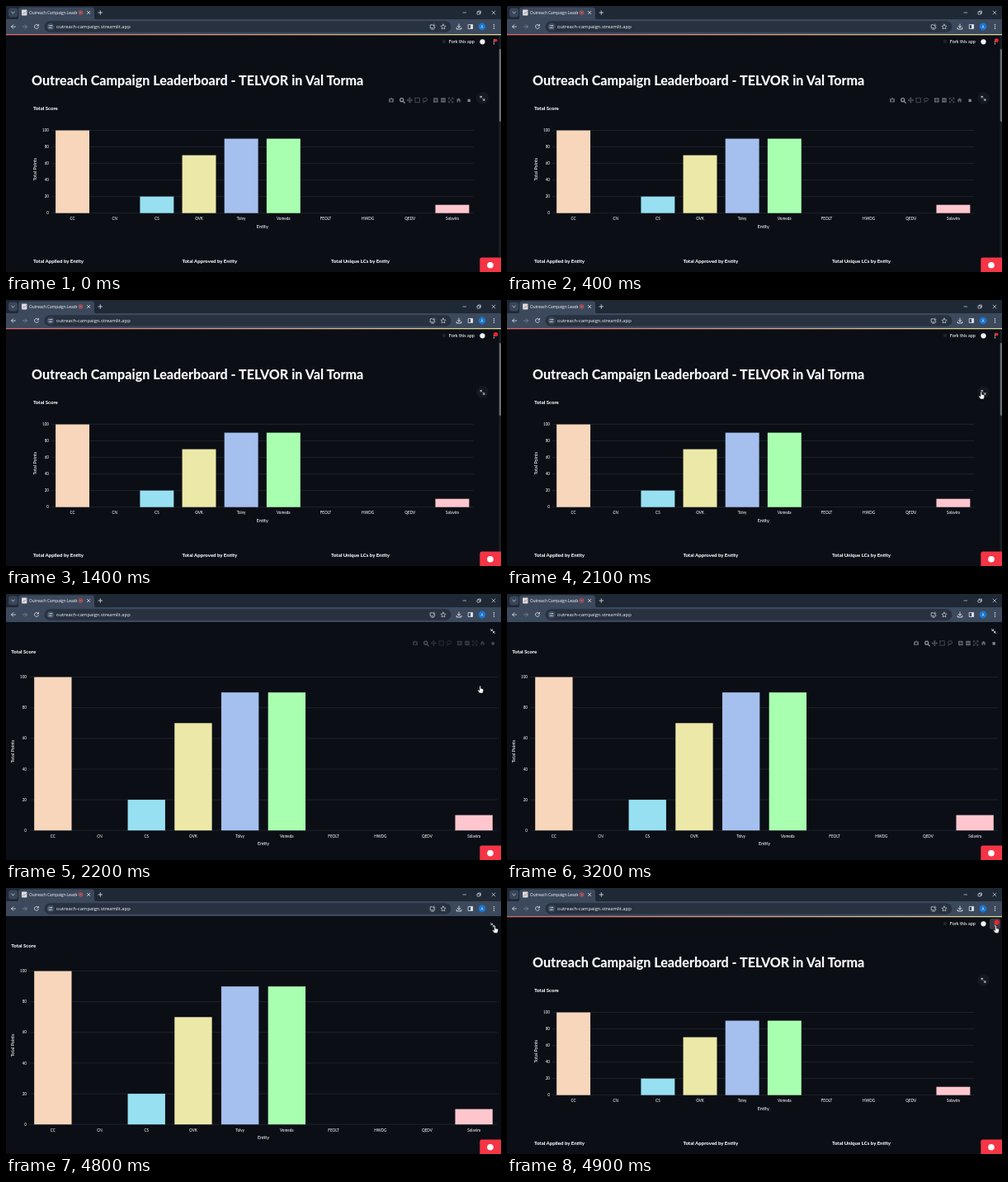
Write an HTML page that moves like this. It is 600x322 px and loops after 5000 ms.

```html
<!DOCTYPE html>
<html lang="en">
<head>
<meta charset="utf-8">
<title>Leaderboard</title>
<style>
  html, body { margin: 0; width: 100%; height: 100%; overflow: hidden; background: #0b0e15; }
  svg { display: block; width: 600px; height: 322px; font-family: Lato, "Open Sans", sans-serif; font-weight: 500; }
  .ui { font-family: "Open Sans", "Noto Sans", sans-serif; font-weight: 400; }
  .line { fill: none; stroke: #dfe4ea; stroke-width: .8; stroke-linecap: round; stroke-linejoin: round; }
  .modebar .line { stroke: #5f646c; }
</style>
</head>
<body>
<svg id="stage" viewBox="0 0 600 322">
  <defs>
    <linearGradient id="strip"><stop stop-color="#d9696c"/><stop offset="1" stop-color="#dcd79a"/></linearGradient>
    <clipPath id="tabClip"><rect x="27" y="2" width="59" height="13"/></clipPath>
  </defs>
</svg>
<script>
const LOOP = 5000, OPEN = 2200, CLOSE = 4900;
const stage = document.getElementById('stage');
const clamp = v => Math.max(0, Math.min(1, v));

// y is the vertical middle of the text
const text = (x, y, size, str, attrs = '') =>
  `<text x="${x}" y="${y + size * .35}" font-size="${size}" fill="#f8f9fb" ${attrs}>${str}</text>`;
const rect = (x, y, w, h, fill, r = 0) =>
  `<rect x="${x}" y="${y}" width="${w}" height="${h}" rx="${r}" fill="${fill}"/>`;
const dot = (x, y, r, fill) => `<circle cx="${x}" cy="${y}" r="${r}" fill="${fill}"/>`;
const line = (d, attrs = '') => `<path class="line" d="${d}" ${attrs}/>`;
const at = (x, y, body) => `<g transform="translate(${x} ${y})">${body}</g>`;
const kebab = (x, y) => [-2.3, 0, 2.3].map(d => dot(x, y + d, .7, '#e6eaef')).join('');
const bold = 'font-weight="800"', middle = 'text-anchor="middle"';

function browser() {
  return `<g class="ui">
    ${rect(0, 0, 600, 17, '#1f2835')}
    ${rect(3, 2.5, 11, 11, '#38465a', 3)}${line('M6.8 7.3l1.7 1.6 1.7-1.6')}
    <path d="M12 16.5q3 0 3-3V5q0-3.5 3.5-3.5h85q3.5 0 3.5 3.5v8.5q0 3 3 3z" fill="#3c495c"/>
    ${rect(0, 16, 600, 18, '#3c495c')}
    ${rect(19, 4.6, 6.4, 6.8, '#dcdfe3', .6)}${line('M20.3 9.8l1.5-2 1.2 1 1.4-2.2', 'style="stroke:#b0716d;stroke-width:.7"')}
    <g clip-path="url(#tabClip)">${text(28, 8, 4.8, 'Outreach Campaign Leaderboard')}</g>
    <circle cx="90.5" cy="8" r="2.4" fill="none" stroke="#d45a58" stroke-width=".8"/>${dot(90.5, 8, 1.2, '#ef5350')}
    ${line('M98.4 6.3l3.4 3.4m0-3.4l-3.4 3.4M112 8h4.6M114.3 5.7v4.6')}
    ${line('M554 8h3.6M571.4 7h3v3h-3zM572.4 7V6h3v3h-1M589 6l4 4m0-4l-4 4', 'style="stroke-width:.65"')}
    ${line('M11.5 25H6.6m2.2-2.3L6.5 25l2.3 2.3')}
    ${line('M20.5 25h4.9m-2.2-2.3l2.3 2.3-2.3 2.3', 'style="stroke:#7f8b9a"')}
    ${line('M39.2 23.6a2.5 2.5 0 1 0 .2 2.2M39.4 22.3v1.7h-1.7')}
    ${rect(46.5, 18.2, 493, 13.6, '#273140', 6.8)}
    ${dot(54, 25, 4.6, '#3c495c')}
    ${line('M51.8 23.8h2.2m1.4 0h.6M51.8 26.4h.6m1.4 0h2.2', 'style="stroke-width:.7"')}
    ${dot(54.8, 23.8, .7, '#dfe4ea')}${dot(53.2, 26.4, .7, '#dfe4ea')}
    ${text(61, 24.7, 5.8, 'outreach-campaign.streamlit.app')}
    ${line('M517 22.8h-2.8v4h5.6v-1.2M515.7 28.2h2.6M518.8 22v2.6m-1.1-1l1.1 1.1 1.1-1.1', 'style="stroke-width:.7"')}
    ${line('M530 22.1l.9 1.9 2.1.3-1.5 1.5.4 2.1-1.9-1-1.9 1 .4-2.1-1.5-1.5 2.1-.3z', 'style="stroke-width:.65"')}
    ${line('M549 22v4m-1.8-1.6l1.8 1.8 1.8-1.8M546.2 26.4v1.6h5.6v-1.6', 'style="stroke-width:.9"')}
    ${line('M560.6 22.5h5v5h-5z')}${rect(563.2, 22.5, 2.5, 5, '#e6eaef')}
    ${dot(577, 25, 4.4, '#1976d2')}${text(577, 25, 4.6, 'A', middle)}
    ${kebab(591.5, 25)}
  </g>`;
}

const bars = [
  ['CC', 100, '#f8d6bb'], ['CN', 0], ['CS', 20, '#97e0f2'], ['OVK', 70, '#ece9a8'],
  ['Tolvy', 90, '#a5c0ee'], ['Vomeda', 90, '#a9ffb0'], ['FEOLT', 0], ['HWDG', 0],
  ['QEDV', 0], ['Solavira', 10, '#ffc6ce']
];

function chart({ left, right, top, base, tickX, titleX, axisY, labelY }) {
  const step = (right - left) / bars.length, y = v => base - (base - top) * v / 100;
  let out = '';
  for (let v = 0; v <= 100; v += 20) {
    out += `<path d="M${left} ${y(v)}H${right}" stroke="#262c36" stroke-width=".7"/>`;
    out += text(tickX, y(v), 4.6, v, 'text-anchor="end"');
  }
  bars.forEach(([name, v, fill], i) => {
    const x = left + step * (i + .5);
    if (v) out += rect(x - step * .4, y(v), step * .8, base - y(v), fill);
    out += text(x, labelY, 4.6, name, middle);
  });
  const mid = (top + base) / 2 - 3;
  return out + text((left + right) / 2, axisY, 5.4, 'Entity', middle) +
    at(titleX, mid, `<g transform="rotate(-90)">${text(0, 0, 5.4, 'Total Points', middle)}</g>`);
}

// Chart toolbar, placed relative to its first icon
function modebar(x, y) {
  const gray = '#5f646c', back = '#0b0e15';
  const lens = 'style="stroke:#959aa2;stroke-width:1.2"', cut = `style="stroke:${back}"`;
  const button = rect(-2.8, -2.8, 5.6, 5.6, gray, .5);
  const parts = [
    [0, rect(-3, -2, 6, 4.6, gray, .6) + rect(-1.2, -2.8, 2.4, 1.2, gray) + dot(0, .3, 1.3, back)],
    [13, `<circle r="2" cx="-.3" cy="-.3" class="line" ${lens}/>` + line('M1.5 1.5l1.8 1.8', lens)],
    [22.3, line('M-3 0h6M0-3v6M-2-1l-1 1 1 1M2-1l1 1-1 1M-1-2l1-1 1 1M-1 2l1 1 1-1')],
    [31.6, line('M-2.7-2.7h5.4v5.4h-5.4z', 'stroke-dasharray="1.1 1.1"')],
    [41, line('M-1.5 1.3C-4-1-2-2.8 .5-2.6S3.6.2 1 .9-.8 1-1.5 1.3t-.6 1.6')],
    [53.8, button + line('M-1.5 0h3M0-1.5v3', cut)],
    [63, button + line('M-1.5 0h3', cut)],
    [72.2, line('M-2.6-2.6l5.2 5.2m0-5.2l-5.2 5.2M-2.8-1.2v-1.6h1.6M1.2-2.8h1.6v1.6M2.8 1.2v1.6H1.2M-1.2 2.8h-1.6V1.2', 'style="stroke-width:.6"')],
    [81.6, `<path d="M-3 .1L0-2.7 3 .1H2.1V2.6H.7V.8H-.7V2.6H-2.1V.1z" fill="${gray}"/>`],
    [94.2, rect(-1.7, -1.3, 3.4, 3.4, '#80858c')]
  ];
  return `<g class="modebar">${at(x, y, parts.map(([dx, s]) => at(dx, 0, s)).join(''))}</g>`;
}

const expand = line('M-2.4-.7v-1.7h1.7M-2.4-2.4L-.6-.6M2.4.7v1.7H.7M2.4 2.4L.6.6', 'style="stroke-width:.75"');
const collapse = line('M-.6-2.2v1.6h-1.6M-.6-.6l-2-2M.6 2.2V.6h1.6M.6.6l2 2', 'style="stroke-width:.8"');

const page = `<g id="page">
  ${rect(0, 34, 600, 1.3, 'url(#strip)')}
  <g id="scrollbar">${rect(597.5, 36, 2.5, 286, '#1b1f27')}${rect(597.8, 52, 2.2, 88, '#6a6e75', 1)}</g>
  ${dot(531, 43, 2.2, '#20242c')}
  ${text(536.8, 43, 5.45, 'Fork this app')}
  ${dot(577.5, 43.3, 3.1, '#f4f5f7')}
  <rect id="menuHover" x="585" y="37" width="13" height="13" rx="2.5" fill="#343943"/>
  ${kebab(591.5, 43.5)}
  <circle id="rec" cx="593.6" cy="41.6" fill="#e8252f"/>
  ${text(31, 90, 16.1, 'Outreach Campaign Leaderboard - TELVOR in Val Torma', bold)}
  ${text(33, 123.7, 6.05, 'Total Score', bold)}
  ${modebar(467, 114)}
  ${dot(577.5, 111.5, 7.5, '#141820')}${at(577.5, 111.8, expand)}
  ${chart({ left: 55, right: 566.5, top: 150.6, base: 250.7, tickX: 52, titleX: 35, axisY: 267, labelY: 257.5 })}
  ${text(33, 309, 6.05, 'Total Applied by Entity', bold)}
  ${text(213.5, 309, 6.05, 'Total Approved by Entity', bold)}
  ${text(394, 309, 6.05, 'Total Unique LCs by Entity', bold)}
</g>`;

const full = `<g id="full">
  ${at(590, 45, collapse)}
  ${text(6.3, 69.5, 6.05, 'Total Score', bold)}
  ${modebar(496, 59.5)}
  ${chart({ left: 28.5, right: 595.5, top: 100.6, base: 286.2, tickX: 25, titleX: 8, axisY: 302.3, labelY: 293 })}
</g>`;

const badge = '<path d="M574.3 322V307q0-2.4 2.4-2.4H600V322z" fill="#f43545"/>' + dot(587, 313.7, 3.8, '#fff');
const hand = `<path id="hand" d="M-.8-3.9q.8-.9 1.5 0v2.7l2.4.6q.9.3.8 1.3l-.6 2.7-.5 1h-3.4L-3 1.4q-.2-1 .8-.9l1.4.9z"
  fill="#fff" stroke="#15181e" stroke-width=".45"/>`;

stage.innerHTML += rect(0, 0, 600, 322, '#0b0e15') + browser() + page + full + badge + hand;

const el = id => document.getElementById(id);
const toolbars = document.querySelectorAll('.modebar');
const show = (node, on) => node.setAttribute('display', on ? 'inline' : 'none');

function draw(now) {
  const t = Math.floor(now % LOOP / 100) * 100;
  const isFull = t >= OPEN && t < CLOSE;
  show(el('page'), !isFull);
  show(el('full'), isFull);
  show(el('menuHover'), t >= CLOSE);
  show(el('scrollbar'), t < CLOSE);
  el('rec').setAttribute('r', 1.9 + 1.2 * Math.sin(Math.PI * t / 2000) ** 2);

  toolbars[0].setAttribute('opacity', t < OPEN ? clamp((725 - t) / 325) : 0);
  toolbars[1].setAttribute('opacity', Math.min(clamp((t - 2050) / 300), clamp((4700 - t) / 300)));

  const late = t >= 4500;
  show(el('hand'), late || (t >= 1900 && t < 2500));
  el('hand').setAttribute('transform', late ? 'translate(592.6 50.2)' : 'translate(574.8 115.5)');
  requestAnimationFrame(() => draw(performance.now() - start));
}
const start = performance.now();
draw(0);
</script>
</body>
</html>
```
